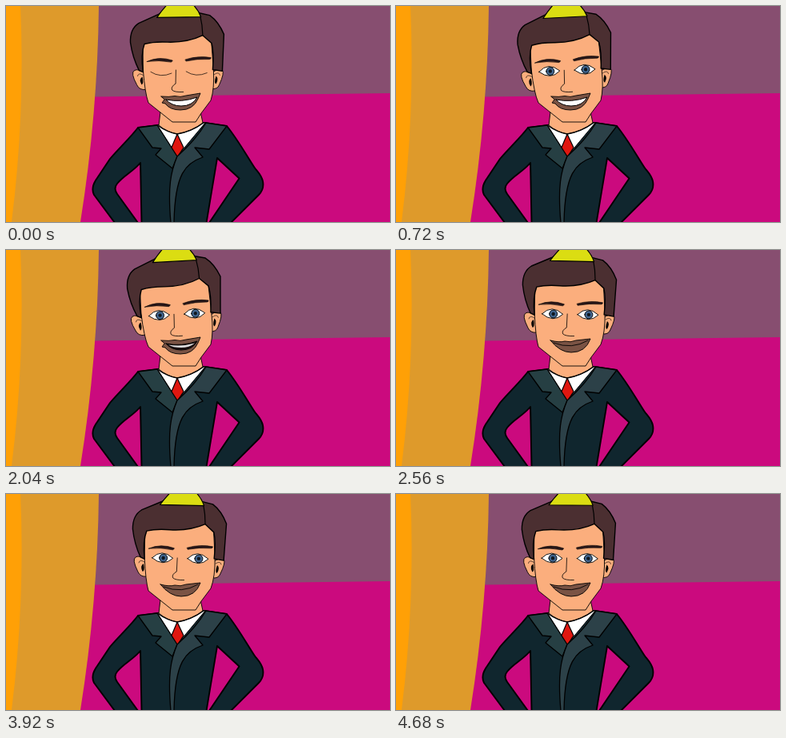
Animation of 480 by 270 pixels, one loop 4840 ms. Source, as an HTML page with a canvas:

```html
<!DOCTYPE html>
<html>
<head>
<meta charset="utf-8">
<style>
html, body { margin: 0; width: 100%; height: 100%; overflow: hidden; }
canvas { display: block; width: 480px; height: 270px; }
</style>
</head>
<body>
<canvas id="stage" width="480" height="270"></canvas>
<script>
const ctx = document.getElementById('stage').getContext('2d');
const LOOP = 4840;
const SKIN = '#fbae7d', HAIR = '#4b2f31', LIPS = '#7a5344';
const SUIT = '#10262e', LAPEL_LEFT = '#263f43', LAPEL_RIGHT = '#2c4148';

function shape(d, fill, line = 0) {
  const path = new Path2D(d);
  if (fill) {
    ctx.fillStyle = fill;
    ctx.fill(path);
  }
  if (line) {
    ctx.strokeStyle = '#000';
    ctx.lineWidth = line;
    ctx.stroke(path);
  }
}

function dot(x, y, r, fill, line = 0) {
  shape(`M${x - r} ${y}a${r} ${r} 0 1 0 ${2 * r} 0a${r} ${r} 0 1 0 ${-2 * r} 0Z`, fill, line);
}

// Turning points of the head sway: time and sideways offset of the temple.
const sway = [[-600, 4], [560, -5.7], [1320, 0.8], [2040, -5.5], [2780, 4],
  [3440, -1.5], [4240, 4], [5400, -5.7]];

function headAngle(t) {
  const i = sway.findIndex(([time]) => time > t);
  const [t0, a] = sway[i - 1], [t1, b] = sway[i];
  const ease = (1 - Math.cos(Math.PI * (t - t0) / (t1 - t0))) / 2;
  return (a + (b - a) * ease) / 100;
}

function mouthPose(t) {
  const phase = t % 1120;
  if (phase < 120) return 'smile';
  if (phase < 640) return 'closed';
  return phase < 840 ? 'smile' : 'talk';
}

function drawBackground() {
  ctx.fillStyle = '#874e70';
  ctx.fillRect(0, 0, 480, 270);
  shape('M90 113.8L480 109V270H90Z', '#cb0a7e');
  shape('M0 0H116Q114.5 135 93 270H0Z', '#de9a2b');
  shape('M0 0H18Q24 135 7 270H0Z', '#ffa006');
}

function drawBody() {
  shape('M165 152C156 164 142 177 130 191L112 218Q106 228 110 236L136 271H165L139 235Q134 228 139 222C147 212 160 206 168 196L169.5 271H250.5L264 190L291.5 215.5L254 271H281L316 236Q323 229 321 219C319 210 313 206 310 201C299 184 289 166 276 150L248 146L190 149Z', SUIT, 1.9);
  shape('M189 149L214 188L249 146Z', '#fff', 1);
  shape('M193 132L191 149Q202 158 214 160Q232 157 246 146L243 132Z', SKIN, 0.9);
  shape('M189 149Q202 158 214 160Q232 157 247 146', null, 1.5);
  shape('M214 160L206 179L214 189L222 177Z', '#df1710', 1.2);
  shape('M165 152L189 149L214 188L208 203L187 186L194 178L183 177Z', LAPEL_LEFT, 1.3);
  shape('M250 146L276 150L254 179L236 177L246 189C225 196 211 209 210 271H206C202 225 206 207 214 188Q237 168 250 146Z', LAPEL_RIGHT, 1.3);
}

function drawEye(x, closed) {
  if (closed) {
    shape(`M${x - 14} 82Q${x - 2} 90 ${x + 12} 84`, null, 0.7);
    return;
  }
  const almond = `M${x - 14} 80.5Q${x - 2} 68 ${x + 12} 80.5Q${x} 92 ${x - 14} 80.5Z`;
  shape(almond, '#fff');
  dot(x, 80.4, 5, '#40658f', 0.9);
  dot(x, 80.4, 2.2, '#101820');
  shape(almond, null, 0.9);
}

function drawMouth(pose) {
  if (pose === 'closed') {
    shape('M193 113Q204 116 211 114Q218 116 225 113L243 111Q237 128 219 128Q205 128 193 113Z', LIPS, 0.9);
    shape('M197 116Q220 125 240 113', null, 0.9);
    return;
  }
  shape('M194 113Q204 114 211 112.5Q218 114.5 225 112L243 109L240 116Q234 130 218 130Q205 130 199 122L195 121L198 117Z', LIPS, 0.9);
  const opening = 'M200 117Q220 121 239 114Q233 125 219 125Q207 125 200 117Z';
  if (pose === 'smile') {
    shape(opening, '#fff', 1);
  } else {
    shape(opening, '#1b1012', 1);
    shape('M203 118.5Q220 121 236 116.5Q229 122 219 122Q209 122 203 118.5Z', '#ddd');
  }
}

// The jaw stays put while the top of the face follows the sway.
function drawFace(angle) {
  const lean = angle * 55, top = angle * 95;
  shape(`M${172 + top} 36L${172 + lean} 80Q${174 + lean / 2} 109 178 121L193 133L208 145H237L244 134L256 118Q${261 + lean / 2} 103 ${260 + lean} 80L${257 + top} 34Z`, SKIN, 0.9);
}

function drawEars() {
  shape('M174 84Q166 77 161 80Q156 83 164 98Q167 105 175 104Z', SKIN, 0.9);
  shape('M258 84Q266 78 271 80.5Q274 84 267 99Q265 105 257 104Z', SKIN, 0.9);
  shape('M171 88Q166 91 170 98Q173 97 171 88Z', '#000');
  shape('M263 88Q267 91 263 98Q260 97 263 88Z', '#000');
  shape('M172 86Q166 82 165 87M261 86Q267 82 268 87', null, 0.6);
}

function drawHairAndHat() {
  shape('M172 82L167 80Q159 64 156.5 45Q156 28 167 21L192 10L205 2L243 9L256 12Q267 20 273.5 36L271 82L259 80Q261 59 258 47L247 37Q228 46 203 45Q186 44 174 47Q169 60 172 82Z', HAIR, 1.4);
  shape('M244 12Q247 25 247 37', null, 1.2);
  shape('M190 14Q197 4 205 -4Q222 -12 234 -3Q242 5 245 14Z', '#dbdd12', 1.2);
}

function drawFeatures(blink) {
  shape('M177 69Q192 62 209 68Q208 70 207 70Q192 67 177 69Z', '#2a1719', 0.6);
  shape('M225 67Q241 62 257 65Q257 67 255 67Q240 66 226 69Z', '#2a1719', 0.6);
  drawEye(195.5, blink);
  drawEye(239.8, blink);
  shape('M213 80L212.5 97Q206 101 208 105Q211 108 222 107.5', null, 0.8);
}

function swayed(angle, draw) {
  ctx.save();
  ctx.translate(217, 135);
  ctx.rotate(angle);
  ctx.translate(-217, -135);
  draw();
  ctx.restore();
}

function drawHead(t) {
  const angle = headAngle(t);
  swayed(angle, drawEars);
  drawFace(angle);
  swayed(angle, () => {
    drawHairAndHat();
    drawFeatures(t < 120);
  });
  drawMouth(mouthPose(t));
}

function render() {
  const t = performance.now() % LOOP;
  // Motion advances in 40 ms steps; the last pose is held.
  const step = Math.min(Math.floor(t / 40) * 40, 4680);
  drawBackground();
  drawBody();
  drawHead(step);
  requestAnimationFrame(render);
}

ctx.lineJoin = ctx.lineCap = 'round';
render();
</script>
</body>
</html>
```
